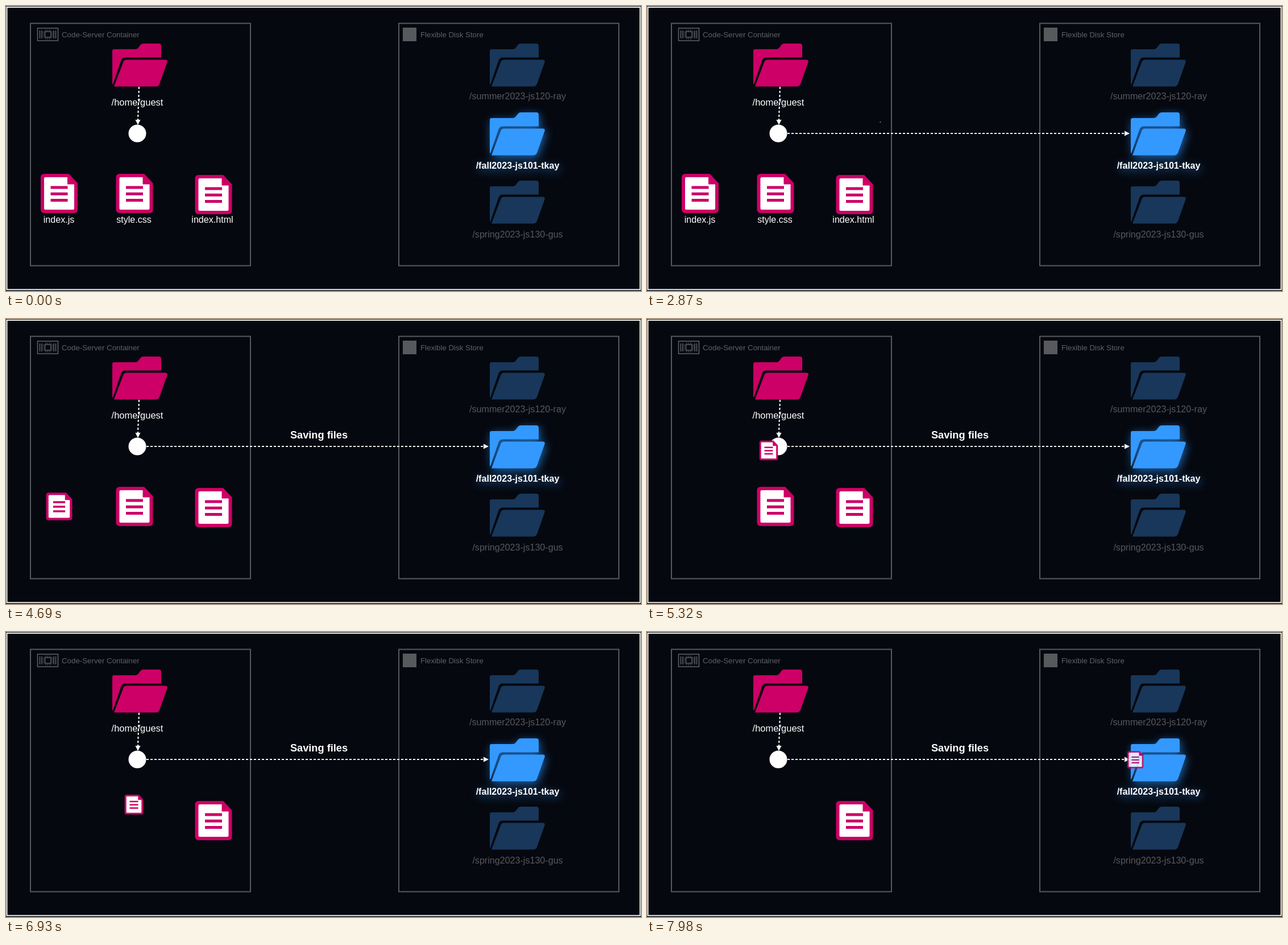
These frames come from a looping animation (1117 px wide and 501 px high, 8000 ms). An HTML page:

```html
<!DOCTYPE html>
<html lang="en">
<head>
<meta charset="utf-8">
<title>Saving files</title>
<style>
  html, body { margin: 0; width: 100%; height: 100%; overflow: hidden; background: #05080f; }
  svg { display: block; }
  text { font: 16.1px "Liberation Sans", Arial, sans-serif; fill: #fff; text-anchor: middle; }
  .title { font-size: 13.3px; fill: #606164; text-anchor: start; }
  .dim { fill: #58595d; }
  .bold { font-weight: bold; }
  .letter { font-size: 18.2px; font-weight: bold; }
  .frame { fill: none; stroke: #58595c; stroke-width: 2; }
  .thin { fill: none; stroke: #606164; stroke-width: 1.5; }
  .dash { stroke: #fff; stroke-width: 2; stroke-dasharray: 4 3; }
  .glow { filter: drop-shadow(2px 4px 8px #1f66b0); }
</style>
</head>
<body>
<svg width="1117" height="501" viewBox="0 0 1117 501">
  <defs>
    <g id="folder">
      <path d="M3 10H41Q44 10 46 7L49 3Q51 0 55 0H82Q86 0 86 4V24.500H23Q17.500 24.500 15.500 29.500L1 72L0 71V13Q0 10 3 10Z"/>
      <path d="M25 28.500H93Q98 28.500 96.500 33L83 71Q81 75.500 76 75.500H3L19.500 32Q21 28.500 25 28.500Z"/>
    </g>
    <g id="file">
      <path fill="#cc0066" d="M-26 -34.500H17L32.500 -18V28Q32.500 34.500 26 34.500H-26Q-32.500 34.500 -32.500 28V-28Q-32.500 -34.500 -26 -34.500Z"/>
      <path fill="#fff" d="M-24 -28.500H14.500V-16H26.500V26Q26.500 28.500 24 28.500H-24Q-26.500 28.500 -26.500 26V-26Q-26.500 -28.500 -24 -28.500Z"/>
      <path stroke="#cc0066" stroke-width="5" d="M-15 -10.500H15M-15 .8H15M-15 12H15"/>
    </g>
  </defs>

  <rect x="1.500" y="2" width="1114" height="496.500" fill="none" stroke="#f4f6f4" stroke-width="2"/>
  <rect class="frame" x="43" y="30.500" width="387" height="426"/>
  <rect class="frame" x="691" y="30.500" width="387" height="426"/>

  <rect class="thin" x="55.500" y="39" width="36" height="22"/>
  <path class="thin" d="M59.500 43V57M63 43V57M84 43V57M87.500 43V57"/>
  <rect class="thin" x="68.500" y="45" width="10.500" height="10"/>
  <path class="thin" stroke-dasharray="1.500 2" d="M69 42.500H80M69 57.500H80M66 45V56M81.500 45V56"/>
  <text class="title" x="98" y="55">Code-Server Container</text>
  <rect x="698" y="38" width="24" height="24" fill="#58595c"/>
  <text class="title" x="729" y="55">Flexible Disk Store</text>

  <use href="#folder" x="187" y="66" fill="#cc0066"/>
  <text x="231" y="175" style="font-size:16.5px">/home/guest</text>
  <use href="#folder" x="851" y="66" fill="#18375a"/>
  <text class="dim" x="900" y="164">/summer2023-js120-ray</text>
  <g class="glow">
    <use href="#folder" x="851" y="187" fill="#3399ff"/>
    <text class="bold" x="900" y="286">/fall2023-js101-tkay</text>
  </g>
  <use href="#folder" x="851" y="307" fill="#18375a"/>
  <text class="dim" x="900" y="407">/spring2023-js130-gus</text>

  <path class="dash" d="M234 142L232 201"/>
  <path fill="#fff" d="M227.500 200H236.500L232 209Z"/>
  <circle cx="231" cy="224" r="15.500" fill="#fff"/>
  <g id="arrow">
    <line id="shaft" class="dash" x1="247" y1="224" y2="224"/>
    <path id="head" fill="#fff" d="M0 0L-9 -4.500V4.500Z"/>
  </g>
  <g id="letters"><text id="caption" class="letter" x="550.500" y="210">Saving files</text></g>

  <g id="labels">
    <text x="93" y="381">index.js</text>
    <text x="225" y="381">style.css</text>
    <text x="363" y="381">index.html</text>
  </g>
  <use href="#file" x="365" y="331.500"/>
  <use href="#file" id="script"/>
  <use href="#file" id="sheet"/>
</svg>
<script>
const LOOP = 8000;
const el = id => document.getElementById(id);
const ramp = (t, from, to) => Math.min(1, Math.max(0, (t - from) / (to - from)));
const sine = p => (1 - Math.cos(Math.PI * p)) / 2;
const cubic = p => p < .5 ? 4 * p ** 3 : 1 - 4 * (1 - p) ** 3;
const mix = (a, b, p) => a + (b - a) * p;
const place = (node, x, y, scale) =>
  node.setAttribute("transform", `translate(${x} ${y}) scale(${scale})`);

const files = [
  { node: el("script"), x: 93.5, y: 329.5, endX: 847, delay: 0 },
  { node: el("sheet"), x: 226, y: 329.5, endX: 859, delay: 1985 }
];

// Split the caption into letters that remember their resting centre.
const caption = el("caption");
const letters = [...caption.textContent].map((char, i) => {
  const box = caption.getExtentOfChar(i);
  const node = caption.cloneNode();
  node.removeAttribute("id");
  node.setAttribute("x", 0);
  node.setAttribute("y", 6);
  node.textContent = char;
  return { node, x: box.x + box.width / 2, arrival: 3565 + (5 - i) * 77 };
});
el("letters").replaceChildren(...letters.map(l => l.node));

function drawArrow(t) {
  const p = sine(ramp(t, 1260, 2660));
  const tip = mix(247, 849, p);
  el("arrow").style.visibility = p > 0 ? "visible" : "hidden";
  el("shaft").setAttribute("x2", Math.max(247, tip - 7));
  place(el("head"), tip, 224, 1);
}

function drawLetter({ node, x, arrival }, t) {
  const distance = 33.6 * Math.max(0, (arrival - t) / 77) ** 1.55;
  const scale = Math.max(0, 1 - distance / 320) ** 2;
  node.style.visibility = scale > 0 ? "visible" : "hidden";
  place(node, x - distance, 204, scale);
}

// Each file shrinks, moves to the dot, follows the line and fades out.
function drawFile({ node, x, y, endX, delay }, time) {
  const t = time - delay;
  const shrink = sine(ramp(t, 4340, 4970));
  const toDot = sine(ramp(t, 4700, 5440));
  const along = cubic(ramp(t, 5440, 5975));
  const fade = ramp(t, 5975, 6150);
  place(node, mix(mix(x, 222, toDot), endX, along), mix(y, 224.5, toDot),
    mix(1, .5, shrink) * (1 - fade));
  node.style.opacity = 1 - Math.sqrt(fade) / 2;
}

function draw(now) {
  const t = now % LOOP;
  drawArrow(t);
  letters.forEach(l => drawLetter(l, t));
  el("labels").style.opacity = 1 - ramp(t, 3990, 4340);
  files.forEach(f => drawFile(f, t));
  requestAnimationFrame(() => draw(performance.now()));
}
draw(0);
</script>
</body>
</html>
```
